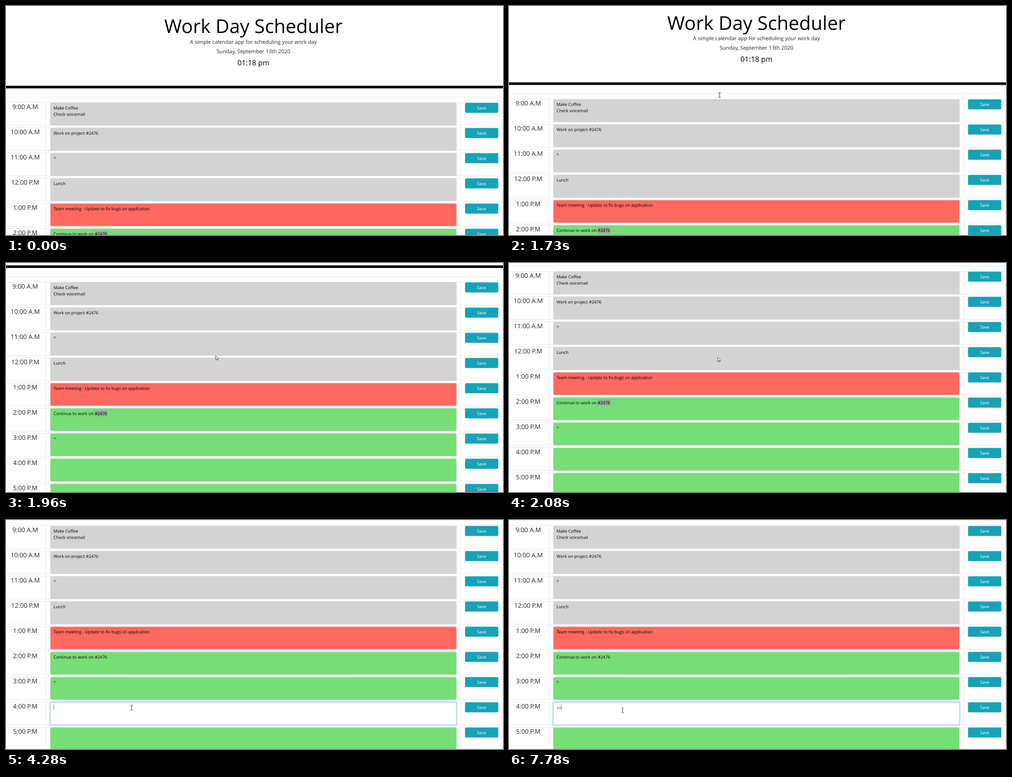
An HTML page for the animation above (8000 ms loop, 1100 by 509 pixels).

```html
<!DOCTYPE html>
<html lang="en">
<head>
<meta charset="utf-8">
<title>Work Day Scheduler</title>
<style>
  html, body { margin: 0; width: 100%; height: 100%; overflow: hidden; background: #fff; }
  svg { display: block; width: 100vw; height: 100vh; }
  text { font-family: "Open Sans", sans-serif; font-size: 9.333px; fill: #000; text-rendering: geometricPrecision; }
  .mid { text-anchor: middle; }
  .dark { fill: #212529; }
  .line { stroke: #e1e4e7; stroke-width: 0.9; fill: none; }
  .typed { fill: #495057; }
</style>
</head>
<body>
<svg id="stage" viewBox="0 0 1100 509"></svg>
<script>
const LOOP = 8000, ROW = 56, TOP = 215;
const PAST = '#d3d3d3', NOW = '#ff6961', NEXT = '#77dd77';

const rows = [
  ['9:00 A.M', PAST, 'Make Coffee', 'Check voicemail'],
  ['10:00 A.M', PAST, 'Work on project #2476'],
  ['11:00 A.M', PAST, '^'],
  ['12:00 P.M', PAST, 'Lunch'],
  ['1:00 P.M', NOW, 'Team meeting - Update to fix bugs on application'],
  ['2:00 P.M', NEXT, 'Continue to work on #2476'],
  ['3:00 P.M', NEXT, '^'],
  ['4:00 P.M', NEXT],
  ['5:00 P.M', NEXT]
];

const stage = document.getElementById('stage');

function add(parent, tag, attrs, content) {
  const el = document.createElementNS('http://www.w3.org/2000/svg', tag);
  for (const k in attrs) el.setAttribute(k, attrs[k]);
  if (content) el.textContent = content;
  return parent.appendChild(el);
}
const box = (p, x, y, width, height, fill, rx = 0) => add(p, 'rect', { x, y, width, height, fill, rx });
const label = (p, x, y, str, cls = '', size = 9.333) =>
  add(p, 'text', { x, y, class: cls, style: `font-size:${size}px` }, str);
const show = (el, on) => el.setAttribute('visibility', on ? 'visible' : 'hidden');

// Page
const page = add(stage, 'g', {});
label(page, 547.7, 60.2, 'Work Day Scheduler', 'mid', 42);
label(page, 547.7, 83.7, 'A simple calendar app for scheduling your work day', 'mid dark', 11.667);
label(page, 547.7, 104.7, 'Sunday, September 13th 2020', 'mid dark', 11.667);
label(page, 547.7, 131.8, '01:18 pm', 'mid', 16.333);
box(page, 0, 177.3, 1100, 5.8, '#000');
add(page, 'path', { class: 'line', d: 'M0 202.3H1100' });

let mark;
rows.forEach(([hour, color, ...lines], i) => {
  const g = add(page, 'g', { transform: `translate(0 ${TOP + ROW * i})` });
  add(g, 'path', { class: 'line', d: 'M0 -.4H1100M0 50.5H1100M88.6 0V50.5M1006.9 0V50.5M1098.7 0V50.5' });
  label(g, 42.6, 13.8, hour, 'mid dark', 14);
  add(g, 'rect', { x: 98.1, y: 0.1, width: 899, height: 50.2, rx: 2.3, fill: color, stroke: '#ced4da', 'stroke-width': 0.6 });
  if (i === 5) mark = box(g, 196.3, 4.6, 27.8, 13, '#95a895');
  lines.forEach((s, n) => label(g, 105.3, 14.5 + 14 * n, s));
  box(g, 1016, 0.2, 73.6, 22.2, '#17a2b8', 2.3);
  label(g, 1052.8, 14.5, 'Save', 'mid').style.fill = '#fff';
});

// Focused field
const field = add(page, 'g', { transform: `translate(0 ${TOP + ROW * 7})` });
add(field, 'rect', { x: 96.9, y: -1.1, width: 901.4, height: 52.6, rx: 3.4, fill: 'none', stroke: '#bfdeff', 'stroke-width': 1.9 });
add(field, 'rect', { x: 98.1, y: 0.1, width: 899, height: 50.2, rx: 2.3, fill: '#fff', stroke: '#80bdff', 'stroke-width': 0.8 });
const typed = label(field, 105.3, 14.5, '', 'typed');
const caret = box(field, 105.4, 5.2, 0.9, 12.2, '#495057');

// Pointers
const beam = add(stage, 'path', {
  d: 'M-2.8 -5.3H-1L0 -4.6L1 -5.3H2.8M0 -4.6V4.6M-2.8 5.3H-1L0 4.6L1 5.3H2.8',
  fill: 'none', stroke: '#333', 'stroke-width': 1
});
const arrow = add(stage, 'path', {
  d: 'M0 0V9.4L2.2 7.4L3.7 10.9L5.2 10.2L3.7 6.9H6.6Z',
  fill: '#fff', stroke: '#222', 'stroke-width': 0.8
});

const bursts = [[300, 1050], [1170, 1960], [2080, 2850], [2950, 3720], [3840, 4610], [4710, 5480]];
const ticks = [0, ...bursts.flatMap(([a, b]) =>
  Array.from({ length: 8 }, (_, k) => Math.floor((a + (b - a) * k / 7) / 10) * 10)),
  5910, 6460, 7010, 7560, 7780];

// time, x, y
const path = [
  [300, 1051, 498], [500, 850, 366], [700, 695, 268], [1050, 541, 178],
  [1390, 482, 191], [1620, 466, 198], [1730, 466, 198], [1960, 464, 205.5],
  [2190, 460, 213], [2410, 445, 244], [2520, 431, 262], [2630, 417, 272], [2850, 361, 310.5],
  [2950, 355, 315], [3270, 314, 349], [3490, 293, 374], [3720, 279, 414],
  [3840, 278, 417], [4500, 278, 417], [4610, 274, 418], [4820, 258, 422], [4930, 251.5, 423]
];
// time, offset
const scroll = [[1620, 0], [1730, 7.6], [1850, 88], [1960, 172], [2080, 196], [2190, 201.9]];
const blinks = [3840, 4390, 4930, 5370, 5910, 6460, 7010];

function at(keys, t, col) {
  const n = keys.findIndex(k => k[0] > t);
  if (n === 0) return keys[0][col];
  if (n < 0) return keys[keys.length - 1][col];
  const a = keys[n - 1], b = keys[n];
  return a[col] + (b[col] - a[col]) * (t - a[0]) / (b[0] - a[0]);
}

function draw(time) {
  const t = ticks.findLast(k => k <= time);
  page.setAttribute('transform', `translate(0 ${-at(scroll, t, 1)})`);

  const pos = `translate(${at(path, t, 1)} ${at(path, t, 2)})`;
  const pointing = t < 400 || (t > 1000 && t < 1600) || (t > 1800 && t < 2150);
  beam.setAttribute('transform', pos);
  arrow.setAttribute('transform', pos);
  show(beam, t >= 300 && !pointing);
  show(arrow, t >= 300 && pointing);

  const focused = t >= 3840;
  show(mark, !focused);
  show(field, focused);
  const word = t >= 7780 ? 'su' : t >= 7560 ? 's' : '';
  if (typed.textContent !== word) typed.textContent = word;
  caret.setAttribute('x', 105.4 + (word ? typed.getComputedTextLength() : 0));
  show(caret, blinks.filter(b => b <= t).length % 2 === 1);
}

const start = performance.now();
function tick() {
  draw((performance.now() - start) % LOOP);
  requestAnimationFrame(tick);
}
tick();
</script>
</body>
</html>
```
